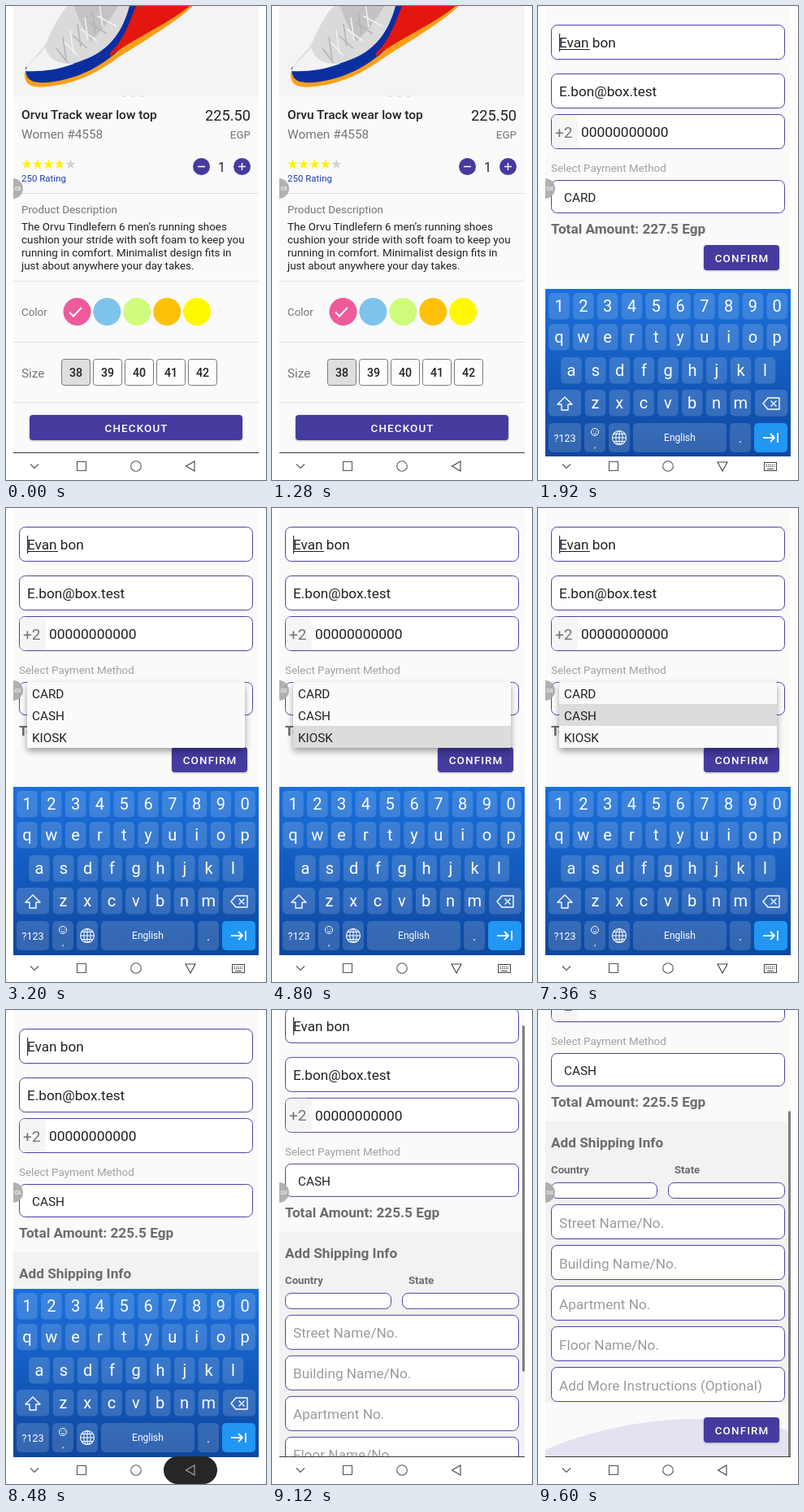
Recreate the animation shown at these times as an HTML page. Size 320 px wide and 583 px high, loop 9.76 s.

```html
<!DOCTYPE html>
<html lang="en">
<head>
<meta charset="utf-8">
<title>Checkout flow</title>
<style>
  html, body { margin: 0; width: 100%; height: 100%; overflow: hidden; background: #fff; }
  svg { position: fixed; left: 0; top: 0; display: block; }
  text { font-family: Roboto, "Noto Sans", sans-serif; white-space: pre; }
</style>
</head>
<body>
<svg id="stage" width="320" height="583" viewBox="0 0 320 583"></svg>
<script>
const LOOP = 9760, STEP = 160;
const INDIGO = '#453b9f', INK = '#212121', GREY = '#757575';

// ---- drawing helpers ----
const stage = document.getElementById('stage');
function add(parent, tag, attrs, text) {
  const el = document.createElementNS('http://www.w3.org/2000/svg', tag);
  for (const k in attrs) el.setAttribute(k, attrs[k]);
  if (text !== undefined) el.textContent = text;
  return parent.appendChild(el);
}
const group = (p, attrs) => add(p, 'g', attrs || {});
const rect = (p, x, y, width, height, fill, rx = 0, more) =>
  add(p, 'rect', { x, y, width, height, fill, rx, ...more });
const disc = (p, cx, cy, r, fill, more) => add(p, 'circle', { cx, cy, r, fill, ...more });
const path = (p, d, fill, more) => add(p, 'path', { d, fill, ...more });
const line = (p, d, stroke, w = 1, more) =>
  path(p, d, 'none', { stroke, 'stroke-width': w, ...more });
const label = (p, x, y, size, fill, str, more) =>
  add(p, 'text', { x, y, 'font-size': size, fill, ...more }, str);
const BOLD = { 'font-weight': 700 };
const MID = { 'text-anchor': 'middle' };
const END = { 'text-anchor': 'end' };

function clip(id, x, y, w, h, rx = 0) {
  rect(add(defs, 'clipPath', { id }), x, y, w, h, '#000', rx);
  return { 'clip-path': `url(#${id})` };
}
function field(p, y, h = 43, x = 16, w = 288) {
  rect(p, x + .5, y + .5, w - 1, h - 1, '#fff', 7, { stroke: '#4d43a5' });
}
function button(p, x, y, w, str) {
  rect(p, x, y + 1, w, 31, '#000', 4, { opacity: .28, filter: 'url(#blur1)' });
  rect(p, x, y, w, 31, INDIGO, 4);
  label(p, x + w / 2 + .6, y + 20.5, 13.4, '#fff', str,
    { ...MID, 'font-weight': 500, 'letter-spacing': 1.15 });
}

const defs = add(stage, 'defs', {});
for (const [id, dev] of [['blur1', 1.2], ['blur4', 4]])
  add(add(defs, 'filter', { id, x: '-20%', y: '-30%', width: '140%', height: '170%' }),
    'feGaussianBlur', { stdDeviation: dev });
const sky = add(defs, 'linearGradient', { id: 'sky', x1: 0, y1: 0, x2: 0, y2: 1 });
add(sky, 'stop', { offset: 0, 'stop-color': '#1a70dc' });
add(sky, 'stop', { offset: 1, 'stop-color': '#0d479f' });

const screen = group(stage, clip('screen', 9, 0, 302, 583));
const view = group(screen, clip('view', 9, 0, 302, 549));

// ---- product page ----
const product = group(view);
rect(product, 9, 0, 302, 549, '#fafafa');
rect(product, 9, 0, 302, 111, '#f4f4f4');
path(product, 'M23 82C22 99 34 101 52 99C92 95 118 78 140 62C175 40 206 22 230 0H150Z', '#f9a01b');
path(product, 'M24 76C24 94 36 95 52 94C92 89 116 74 136 57C152 43 164 20 178 0H140Z', '#0b2fa0');
path(product, 'M128 58C145 42 152 20 160 0H226C200 22 160 38 128 62Z', '#e3170f');
path(product, 'M24 80C28 66 42 60 50 44C58 26 66 10 76 0H152C146 22 136 42 116 56C92 72 50 80 24 80Z', '#dadada');
path(product, 'M24 80C28 68 42 62 48 50C52 66 64 72 84 71C62 79 42 81 24 80Z', '#f3f3f3');
path(product, 'M84 0H138C128 18 116 32 104 44C96 30 88 14 84 0Z', '#c3c3c3');
for (let i = 0; i < 6; i++)
  line(product, `M${62 + i * 10} ${52 - i * 8}l${14 + i * 2} ${18 - i}M${74 + i * 9} ${66 - i * 8}l-4 -28`,
    i % 2 ? '#f2f2f2' : '#b4b4b4', 1.6);
for (const x of [143, 154, 165]) rect(product, x, 110, 5, 2, '#e2e2e2', 1);

label(product, 19, 139, 15.5, INK, 'Orvu Track wear low top', { 'font-weight': 500 });
label(product, 301, 141, 18.2, INK, '225.50', END);
label(product, 19, 163, 15.4, GREY, 'Women #4558');
label(product, 301, 163, 13.4, GREY, 'EGP', END);
for (let i = 0; i < 5; i++) {
  let d = '';
  for (let k = 0; k < 10; k++) {
    const r = k % 2 ? 2.6 : 6.4, a = (k * 36 - 90) * Math.PI / 180;
    d += (k ? 'L' : 'M') + (25.5 + i * 13.5 + r * Math.cos(a)) + ' ' + (194.8 + r * Math.sin(a));
  }
  path(product, d + 'Z', i < 4 ? '#fff200' : '#d2d2d6');
}
label(product, 19, 216, 11.5, '#1c3fae', '250 Rating');
disc(product, 240.5, 197.5, 10.5, INDIGO);
disc(product, 290.5, 197.5, 10.5, INDIGO);
line(product, 'M236 197.5h9M286 197.5h9M290.5 193v9', '#fff', 1.4);
label(product, 265.5, 203.5, 16, INK, '1', MID);
for (const y of [230, 338, 413, 487]) rect(product, 9, y, 302, 1, '#e0e0e0');
label(product, 19, 255, 13.4, GREY, 'Product Description');
['The Orvu Tindlefern 6 men\u2019s running shoes',
 'cushion your stride with soft foam to keep you',
 'running in comfort. Minimalist design fits in',
 'just about anywhere your day takes.'
].forEach((s, i) => label(product, 19, 276 + i * 16, 13.4, INK, s));
label(product, 19, 381, 13.4, GREY, 'Color');
['#ee5a9b', '#7dc3ec', '#cffb7b', '#ffc107', '#fff900'].forEach((c, i) =>
  disc(product, 87.5 + i * 36.9, 376, 17, c));
line(product, 'M78 376.5l5 5L93 371', '#fff', 2);
label(product, 19, 456.5, 15.3, GREY, 'Size');
for (let i = 0; i < 5; i++) {
  const x = 68.5 + i * 39;
  rect(product, x, 434.5, 35, 32, i ? '#fdfdfd' : '#dedede', 3, { stroke: '#7a7a7a' });
  label(product, x + 17.5, 455.5, 14.2, INK, 38 + i, { ...MID, 'font-weight': 500 });
}
button(product, 29, 503, 262, 'CHECKOUT');
const ripple = disc(group(product, clip('cta', 29, 503, 262, 31, 4)), 160, 518, 0, '#fff');

// ---- payment page ----
const pay = group(view);
rect(pay, 9, 0, 302, 549, '#fafafa');
path(pay, 'M9 541C70 514 140 503 195 503C240 503 280 509 311 518V549H9Z', '#e3e2f0');
const form = group(pay);
field(form, 23);
label(form, 26, 51, 17.2, INK, 'Evan bon');
const underline = rect(form, 26, 53, 38, 1, INK);
rect(form, 26, 34, 1.2, 22, '#2a2480');
field(form, 83);
label(form, 26, 111, 17.2, INK, 'E.bon@box.test');
field(form, 133);
rect(form, 17, 134, 32, 41, '#f5f5f6', 6);
label(form, 21, 161.5, 19.1, GREY, '+2');
label(form, 53, 161, 17.4, INK, '00000000000');
label(form, 16, 204, 13.4, '#a0a0a4', 'Select Payment Method');
field(form, 214, 41);
const method = label(form, 32, 241, 15.3, INK, '');
const total = label(form, 16, 280, 17.2, '#6c6c70', '', BOLD);
const plain = group(form);
button(plain, 204, 294, 93, 'CONFIRM');

const shipping = group(form);
rect(shipping, 9, 298, 302, 346, '#f2f2f2');
label(shipping, 16, 330, 17.2, '#6c6c70', 'Add Shipping Info', BOLD);
label(shipping, 16, 362, 13.2, '#6c6c70', 'Country', BOLD);
label(shipping, 168, 362, 13.2, '#6c6c70', 'State', BOLD);
field(shipping, 373, 20, 16, 131);
field(shipping, 373, 20, 160, 144);
['Street Name/No.', 'Building Name/No.', 'Apartment No.', 'Floor Name/No.',
 'Add More Instructions (Optional)'].forEach((s, i) => {
  field(shipping, 400 + i * 50);
  label(shipping, 26, 428.5 + i * 50, 17.2, '#9b9b9b', s);
});
button(shipping, 204, 662, 93, 'CONFIRM');
const thumb = rect(pay, 308, 0, 3, 425, '#7d7d7d');

// ---- floating recorder bubble ----
disc(view, 8.5, 224.5, 12.5, '#a9a9a9', { opacity: .9 });
label(view, 9.5, 227, 6.5, '#fff', ':08');

// ---- dropdown ----
const menu = group(view);
rect(menu, 26, 218, 268, 81, '#000', 2, { opacity: .38, filter: 'url(#blur4)' });
rect(menu, 26, 214, 268, 81, '#fafafa', 1);
const pressed = rect(menu, 26, 0, 268, 27, '#dcdcdc');
['CARD', 'CASH', 'KIOSK'].forEach((s, i) => label(menu, 32, 233.5 + i * 27, 15.3, INK, s));

// ---- keyboard ----
const keys = group(group(screen, clip('keys', 9, 340, 302, 214)));
rect(keys, 9, 343, 302, 207, 'url(#sky)');
function key(cx, y, w, h, str, size, fill = 'rgba(255,255,255,.16)') {
  rect(keys, cx - w / 2, y, w, h, fill, 5);
  if (str) label(keys, cx, y + h / 2 + size * .36, size, '#fff', str, MID);
}
[['1234567890', 26, 348], ['qwertyuiop', 26, 386], ['asdfghjkl', 41, 427], ['zxcvbnm', 70.5, 467]]
  .forEach(([row, x, y]) => [...row].forEach((c, i) => key(x + i * 29.8, y, 25.5, 32.5, c, 20)));
key(33, 467, 40, 32.5);
key(287, 467, 40, 32.5);
key(33, 508, 40, 36, '?123', 12.5);
key(70, 508, 26, 36);
key(100, 508, 26, 36);
key(174.5, 508, 115, 36, 'English', 12);
key(249, 508, 26, 36, '.', 17);
key(286.5, 508, 41, 36, '', 0, '#2196f3');
const strokes = group(keys, { 'stroke-linejoin': 'round' });
line(strokes, 'M33 476l-9 9h5v7h8v-7h5Z', '#fff', 1.4);
line(strokes, 'M277 484l6-7h14v14h-14ZM286.500 480.500l7 7M293.500 480.500l-7 7', '#fff', 1.4);
line(strokes, 'M277 526h14M286 521l5 5l-5 5M295 520v12', '#fff', 1.8);
line(strokes, 'M91.500 526a8.500 8.500 0 1 0 17 0a8.500 8.500 0 1 0 -17 0h17M100 517.500v17M93 521.500h14M93 530.500h14', '#fff', 1.1);
add(strokes, 'ellipse', { cx: 100, cy: 526, rx: 4.2, ry: 8.5, fill: 'none', stroke: '#fff' });
disc(strokes, 70, 519, 4.5, 'none', { stroke: '#fff' });
line(strokes, 'M68 520.500q2 2 4 0M68.300 517.500v1M71.700 517.500v1', '#fff', .9);
label(keys, 70, 538, 11, '#fff', ',', MID);

// ---- navigation bar ----
const edge = rect(screen, 9, 549, 302, 1, '#3a3a3a');
rect(screen, 9, 554, 302, 29, '#fff');
const pill = rect(screen, 194, 549, 66, 34, '#262626', 17);
const nav = group(screen);
line(nav, 'M30 563.500l5 5l5-5M87.500 560.500h11v11h-11Z', '#555', 1.1);
disc(nav, 160, 566, 6.3, 'none', { stroke: '#555', 'stroke-width': 1.1 });
const back = line(nav, 'M221.500 566l10.500-6v12Z', '#444', 1.1);
const hide = group(nav);
line(hide, 'M221 561h12l-6 11Z', '#444', 1.1);
rect(hide, 278.500, 561.500, 15, 10, 'none', 0, { stroke: '#444' });
line(hide, 'M280.500 564.500h11M280.500 566.500h11', '#444', 1, { 'stroke-dasharray': '1.500 1' });
line(hide, 'M282 569.500h8', '#444');

// ---- timeline: [time, value] pairs, linear in between ----
const MENU = [[2720, 0], [2880, .4], [3040, .85], [3200, 1], [4800, 1], [4960, .5], [5120, 0],
  [6080, 0], [6240, .6], [6400, 1], [7360, 1], [7520, .5], [7680, 0]];
const KEYS = [[1600, 210], [1760, 70], [1920, 5], [2080, 0], [8480, 0], [8640, 95], [8800, 210]];
const PILL = [[8160, 0], [8320, .5], [8480, 1], [8640, .75], [8800, .35], [8960, 0]];
const ENTER = [[1440, 0], [1600, .7], [1760, 1]];

function at(table, t) {
  if (t <= table[0][0]) return table[0][1];
  for (let i = 1; i < table.length; i++) {
    const [a, x] = table[i - 1], [b, y] = table[i];
    if (t <= b) return x + (y - x) * (t - a) / (b - a);
  }
  return table[table.length - 1][1];
}
const show = (el, on) => el.setAttribute('display', on ? 'inline' : 'none');
const fade = (el, v) => el.setAttribute('opacity', v);
const shift = (el, y) => el.setAttribute('transform', `translate(0 ${y})`);

function render(t) {
  const tap = (t - 320) / 960;
  show(ripple, t >= 480 && t < 1280);
  ripple.setAttribute('r', Math.max(0, tap * 150));
  fade(ripple, .22 * (1 - tap));

  const enter = at(ENTER, t);
  show(pay, t >= 1600);
  fade(pay, enter);
  shift(pay, (1 - enter) * 60);

  const cash = t >= 7680;
  method.textContent = t < 4960 ? 'CARD' : t < 7520 ? 'KIOSK' : 'CASH';
  total.textContent = `Total Amount: ${t < 5120 ? '227.5' : cash ? '225.5' : '238.35'} Egp`;
  show(underline, !cash);
  show(plain, !cash);
  show(shipping, cash);

  const open = at(MENU, t);
  show(menu, open > 0);
  fade(menu, open);
  show(pressed, t >= 4800 && t < 5120 || t >= 7360 && t < 7680);
  pressed.setAttribute('y', t < 6000 ? 268 : 241);

  const drop = at(KEYS, t), up = t >= 1600 && drop < 210;
  show(keys, up);
  shift(keys, drop);
  show(edge, !up);
  fade(pill, at(PILL, t));
  const typing = t >= 1600 && t < 8480;
  show(hide, typing);
  show(back, !typing);
  back.setAttribute('stroke', at(PILL, t) > .5 ? '#aaa' : '#444');

  const p = Math.min(1, Math.max(0, (t - 8960) / 640));
  const scroll = 161 * p * p * (3 - 2 * p);
  shift(form, -scroll);
  shift(thumb, scroll * 549 / 710);
  show(thumb, scroll > 0);
}

function tick() {
  const t = performance.now() % LOOP;
  render(Math.floor(t / STEP) * STEP);
  requestAnimationFrame(tick);
}
tick();
</script>
</body>
</html>
```
